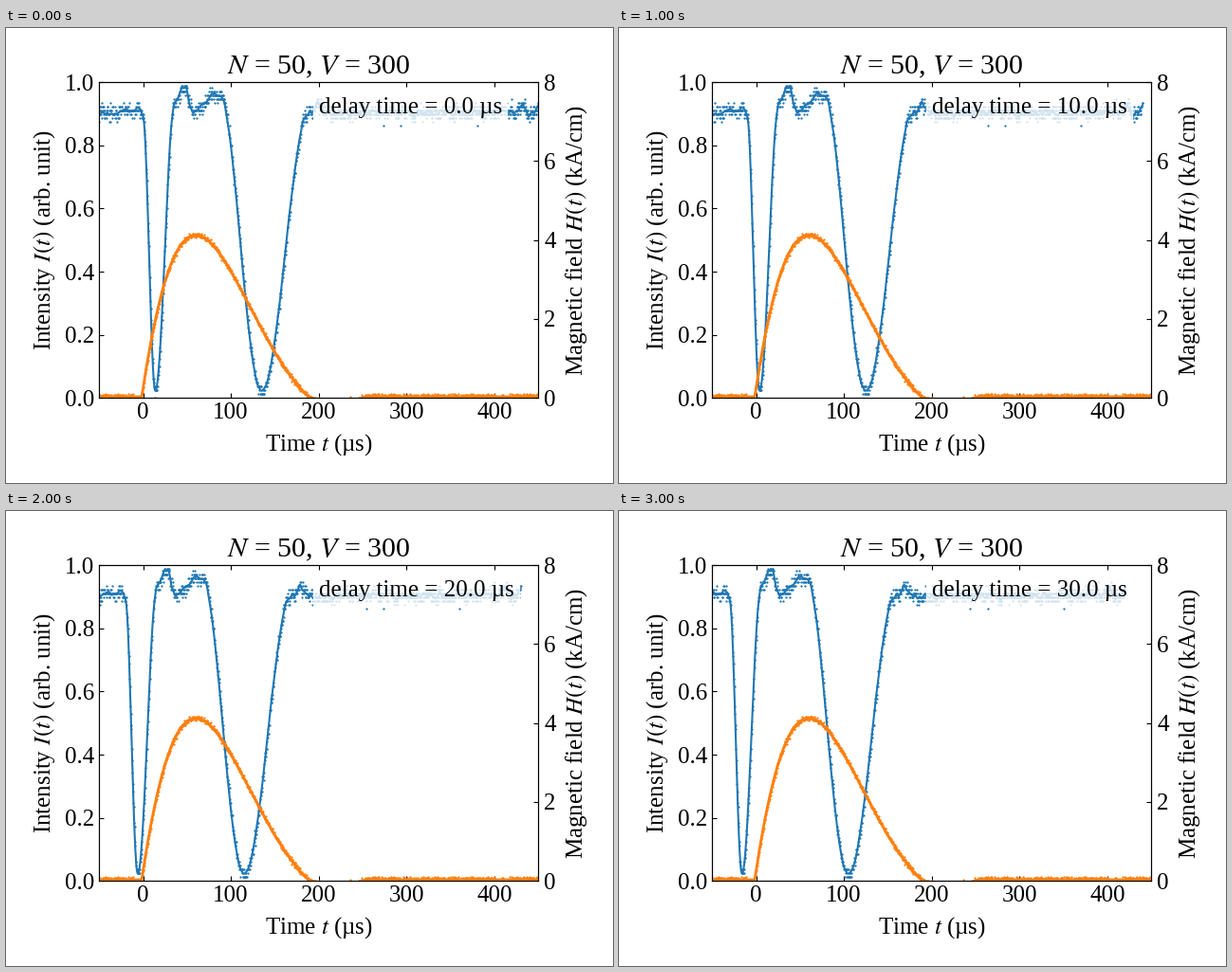
Write a matplotlib script that moves like this. It is 640 by 480 pixels and loops after 3100 ms.

```python
import numpy as np
import matplotlib.pyplot as plt
from matplotlib.animation import FuncAnimation

W, H, DPI = 640, 480, 100
FRAMES, INTERVAL = 31, 100
BLUE, ORANGE = "#1f77b4", "#ff7f0e"

plt.rcParams.update({
    "font.family": "Liberation Serif",
    "font.size": 18,
    "mathtext.fontset": "stix",
    "xtick.direction": "in",
    "ytick.direction": "in",
    "xtick.top": True,
})


def offset(t, center, left, right):
    """Distance from the center, scaled by a different width on each side."""
    return (t - center) / np.where(t < center, left, right)


def bump(t, center, left, right, height):
    return height * np.exp(-offset(t, center, left, right) ** 2)


def dip(t, center, left, right):
    u = np.clip(offset(t, center, left, right), -1, 1)
    return 1 - .975 * np.cos(np.pi * u / 2) ** 2


def intensity(t):
    level = (.903
             + bump(t, -5, 14, 4, .016)
             + bump(t, 48, 11, 4.5, .085)
             + bump(t, 82, 15, 25, .063)
             + bump(t, 199, 6, 5, .026)
             + bump(t, 432, 6, 5, .018)
             + bump(t, 452, 5, 5, .03))
    return level * dip(t, 14, 14.5, 21.5) * dip(t, 135, 47, 54)


def magnetic_field(t):
    """Damped half sine, then a short weak undershoot."""
    s, half, tail = t + 1.5, 189.5, 65
    pulse = 9 * np.exp(-s / 98) * np.sin(np.pi * s / half)
    undershoot = -.16 * np.sin(np.pi * (s - half) / tail)
    return .03 + np.select([s < 0, s < half, s < half + tail],
                           [0, pulse, undershoot], 0)


def digitise(y, step):
    return np.round(y / step) * step


rng = np.random.default_rng(7)
t = np.arange(-100, 450.2, 0.4)

window = np.hanning(15) / np.hanning(15).sum()
wiggle = np.convolve(rng.normal(0, .013, t.size), window, "same")
light = intensity(t)
light = light + wiggle * np.where(light > .85, 1, .3)
light_dots = np.clip(digitise(light + rng.normal(0, .012, t.size), .0123), 0, .99)
field = magnetic_field(t)
field_dots = digitise(field + rng.normal(0, .035, t.size), .035)

fig = plt.figure(figsize=(W / DPI, H / DPI), dpi=DPI)
ax = fig.add_axes([98.2 / W, 89.8 / H, 463 / W, 333 / H])
ax2 = ax.twinx()

dot_style = dict(ls="none", marker="o", ms=1, mew=.6)
dots, = ax.plot(t, light_dots, color=BLUE, **dot_style)
line, = ax.plot(t, light, color=BLUE, lw=1.5)
ax2.plot(t, field_dots, color=ORANGE, **dot_style)
ax2.plot(t, field, color=ORANGE, lw=2)

ax.set(xlim=(-50, 450), ylim=(0, 1), xticks=range(0, 500, 100))
ax.set_xlabel("Time $t$ (µs)", labelpad=6.8)
ax.set_ylabel("Intensity $I(t)$ (arb. unit)", labelpad=5.5)
ax2.set(ylim=(0, 8), yticks=range(0, 10, 2))
ax2.tick_params(axis="y", pad=4.4)
ax2.set_ylabel("Magnetic field $H(t)$ (kA/cm)", labelpad=6)
ax.set_title("$N$ = 50, $V$ = 300")
label = ax.text(200, .902, "", bbox=dict(facecolor="white", edgecolor="white", alpha=.8))


def update(delay):
    dots.set_xdata(t - delay)
    line.set_xdata(t - delay)
    label.set_text(f"delay time = {delay:.1f} µs")
    return dots, line, label


anim = FuncAnimation(fig, update, frames=FRAMES, interval=INTERVAL,
                     repeat=True, repeat_delay=0)
plt.show()
```
